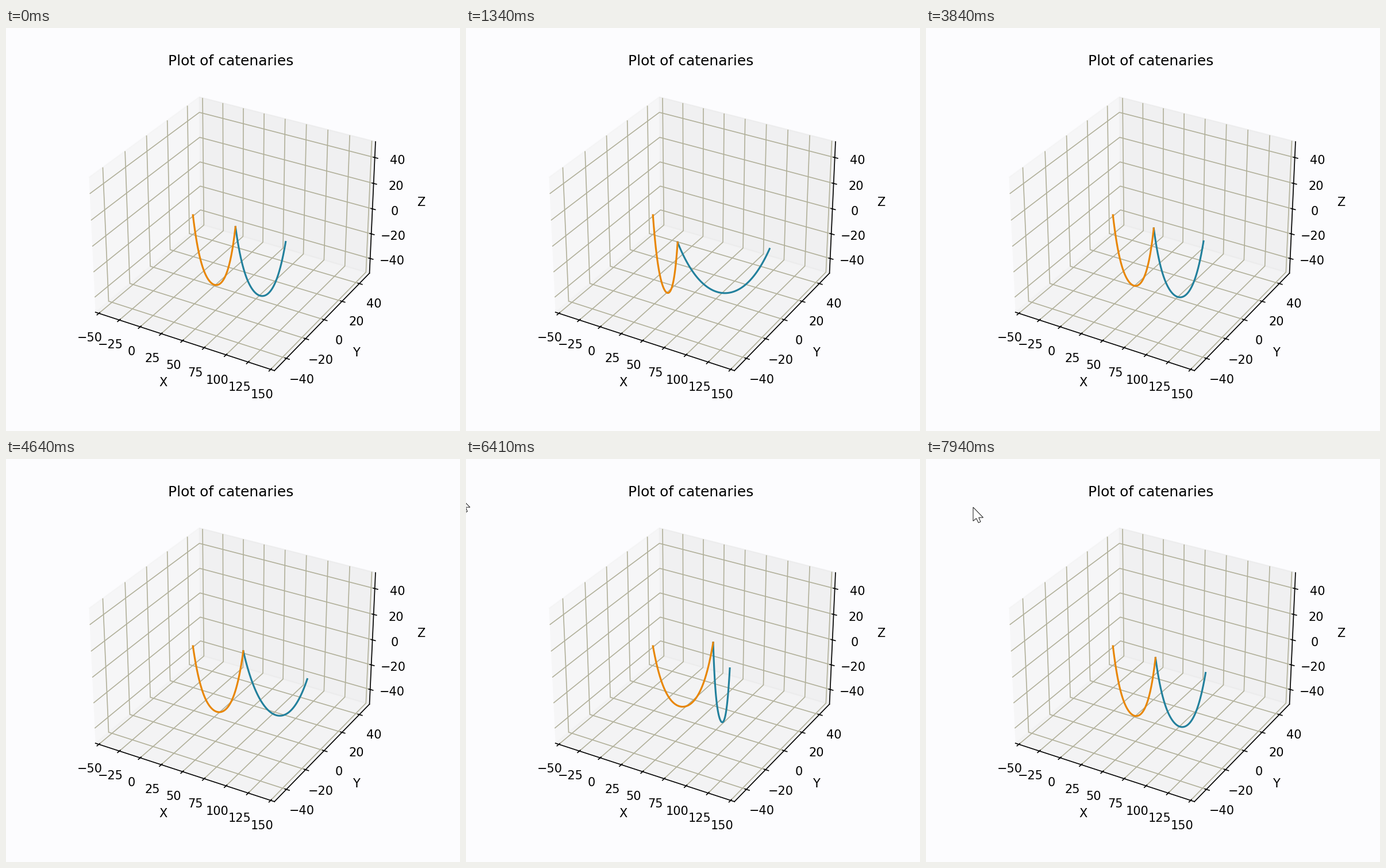
Recreate the animation shown at these times as a matplotlib script. Size 790x702 px, loop 8000 ms.

```python
import numpy as np
import matplotlib.pyplot as plt
from matplotlib.animation import FuncAnimation
from matplotlib.patches import Polygon

W, H, DPI = 790, 702, 150
FRAMES, STEP = 200, 40
ROPE = 121                     # length of each catenary
SIDE = 554.4                   # side of the square axes in pixels
BACK = "#fcfcfe"

# angle of the motion over time (the playback speed wavers a little)
TIMES = [0, 1340, 2510, 3840, 4640, 6410, 7940, 8000]
ANGLES = [-0.04, 1.057, 1.947, 3.065, 3.562, 5.06, 6.258, 6.258]

# mouse pointer: tip position over time, in pixels from the top left
POINTER_T = [6300, 6410, 6740, 7200, 7580, 7940]
POINTER_X = [-24, -11, 3, 40, 69, 82]
POINTER_Y = [62, 66, 70, 77, 82, 84]
ARROW = np.array([(0, 0), (0, 24), (5.5, 19.5), (9.3, 27),
                  (13, 25.3), (9.8, 18), (17.5, 18)])

plt.rcParams.update({
    "font.family": "DejaVu Sans",
    "figure.facecolor": BACK,
    "axes.facecolor": BACK,
    "grid.color": "#b1b09a",
})

fig = plt.figure(figsize=(W / DPI, H / DPI), dpi=DPI)
ax = fig.add_axes([113.8 / W, 70.2 / H, SIDE / W, SIDE / H], projection="3d")
ax.set_title("Plot of catenaries")
ax.set_xlabel("X")
ax.set_ylabel("Y")
ax.set_zlabel("Z")

right, = ax.plot([], [], [], color="#22809c", lw=1.5)
left, = ax.plot([], [], [], color="#e88604", lw=1.5)


def padded(low, high):
    pad = (high - low) / 48
    return low - pad, high + pad


ax.set_xlim(*padded(-50, 150))
ax.set_ylim(*padded(-50, 50))
ax.set_zlim(*padded(-50, 50))

pointer = Polygon(ARROW, closed=True, fc="white", ec="#202020", lw=0.5,
                  transform=None, zorder=10)
fig.add_artist(pointer)


def catenary(p, q):
    """Points of a rope of fixed length hanging between two level points."""
    span = np.hypot(q[0] - p[0], q[1] - p[1])
    ratio = ROPE / span
    u = np.sqrt(6 * (ratio - 1))
    for _ in range(12):
        u -= (np.sinh(u) - ratio * u) / (np.cosh(u) - ratio)
    s = np.linspace(0, 1, 100)
    z = span / (2 * u) * (np.cosh((2 * s - 1) * u) - np.cosh(u))
    return p[0] + s * (q[0] - p[0]), p[1] + s * (q[1] - p[1]), z


def update(i):
    t = i * STEP + STEP / 2
    angle = np.interp(t, TIMES, ANGLES)
    start = (0, 0)
    middle = (50, -20 * np.sin(angle))
    end = (110 + 30 * np.sin(2 * angle), 0)
    left.set_data_3d(*catenary(start, middle))
    right.set_data_3d(*catenary(middle, end))

    x = np.interp(t, POINTER_T, POINTER_X)
    y = np.interp(t, POINTER_T, POINTER_Y)
    pointer.set_xy(np.column_stack([x + ARROW[:, 0], H - y - ARROW[:, 1]]))
    pointer.set_visible(t > POINTER_T[0])
    return left, right, pointer


anim = FuncAnimation(fig, update, frames=FRAMES, interval=STEP,
                     repeat=True, repeat_delay=0, blit=False)
plt.show()
```
